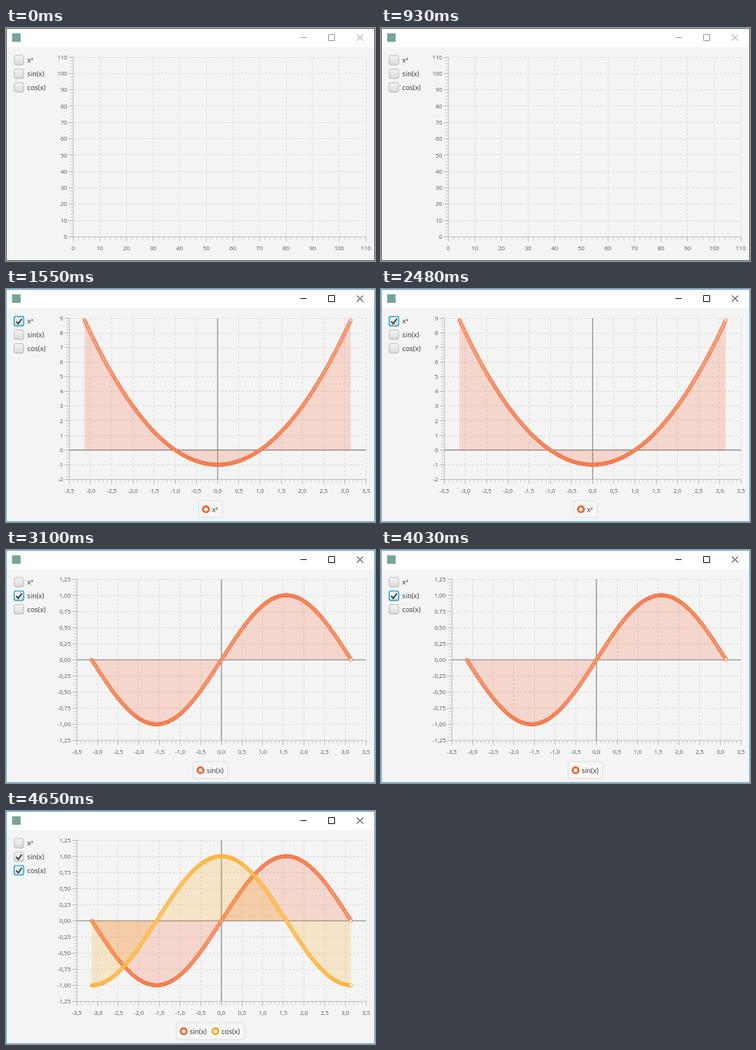
Animation, 480 px wide and 304 px high, one loop 6.2 s. Source, as an HTML page:

```html
<!DOCTYPE html>
<html lang="en">
<head>
<meta charset="utf-8">
<title>Function plotter</title>
<style>
  html, body { margin: 0; width: 100%; height: 100%; overflow: hidden; background: #f4f4f4; }
  svg { position: absolute; left: 0; top: 0; display: block; }
  text { font: 9px "Open Sans", "Noto Sans", sans-serif; fill: #333; }
  .tick { font-size: 7.5px; fill: #555; }
</style>
</head>
<body>
<svg id="stage" width="480" height="304" viewBox="0 0 480 304">
  <defs>
    <linearGradient id="box" x2="0" y2="1">
      <stop offset="0" stop-color="#f6f6f6"/>
      <stop offset="1" stop-color="#d9d9d9"/>
    </linearGradient>
  </defs>
</svg>
<script>
const LOOP = 6200;
const ORANGE = '#f3622d', YELLOW = '#fba71b';
const stage = document.getElementById('stage');

const FUNCS = {
  sq: { label: 'x²', color: ORANGE, f: x => x * x - 1 },
  sin: { label: 'sin(x)', color: ORANGE, f: Math.sin },
  cos: { label: 'cos(x)', color: YELLOW, f: Math.cos }
};
const NAMES = Object.keys(FUNCS);

// Axis: [min, max, step, decimals]; area: [left, top, right, bottom]
const X = [-3.5, 3.5, 0.5, 1], UNIT = [-1.25, 1.25, 0.25, 2], EMPTY = [0, 110, 10, 0];
const WIDE = [92.2, 38, 468.2, 248.4];
const SCENES = [
  { area: [87.5, 38, 468, 272.3], x: EMPTY, y: EMPTY, on: [] },
  { area: [82.3, 38, 468.3, 248.4], x: X, y: [-2, 9, 1, 0], on: ['sq'], focus: 'sq', legend: [250.5, 31] },
  { area: WIDE, x: X, y: UNIT, on: ['sin'], focus: 'sin', legend: [243.5, 45] },
  { area: WIDE, x: X, y: UNIT, on: ['sin', 'cos'], focus: 'cos', legend: [221.5, 89] }
];

function add(parent, tag, attrs, content) {
  const el = document.createElementNS('http://www.w3.org/2000/svg', tag);
  for (const k in attrs) el.setAttribute(k, attrs[k]);
  if (content !== undefined) el.textContent = content;
  parent.appendChild(el);
  return el;
}
const rect = (g, x, y, width, height, fill, more) => add(g, 'rect', { x, y, width, height, fill, ...more });
const path = (g, d, stroke, width = 1, more) =>
  add(g, 'path', { d, stroke, 'stroke-width': width, fill: 'none', ...more });

function drawWindow(g, active) {
  rect(g, 0, 0, 480, 304, '#f4f4f4');
  rect(g, 0, 0, 480, 25, '#fff');
  rect(g, 8, 7, 11, 11, '#78a39d');
  path(g, 'M383 12.5h8M419.5 8.5h8v8h-8zM456.5 8.5l8 8M464.5 8.5l-8 8', active ? '#111' : '#999');
  rect(g, 0.5, 0.5, 479, 303, 'none', { stroke: active ? '#58ace0' : '#5a5a5a' });
}

function drawChecks(g, scene) {
  NAMES.forEach((name, i) => {
    const y = 42 + i * 17.7, focused = scene.focus === name;
    if (focused) rect(g, 10, y - 6.7, 13.6, 13.4, '#039ed3', { rx: 2.4 });
    const inset = focused ? 11.2 : 10.7, size = focused ? 11.2 : 12.2;
    rect(g, inset, y - size / 2, size, size, 'url(#box)',
      { rx: 1.8, stroke: focused ? 'none' : '#b5b5b5', 'stroke-width': 0.9 });
    if (scene.on.includes(name)) path(g, `M13.3 ${y + 0.2}l2.6 3.1l4.8-6.6`, '#3c3c3c', 1.7);
    add(g, 'text', { x: 27.6, y: y + 3.3 }, FUNCS[name].label);
  });
}

function drawAxes(g, { area: [l, t, r, b], x, y }, px, py) {
  const vals = ([min, max, step]) =>
    Array.from({ length: Math.round((max - min) / step) + 1 }, (_, i) => min + i * step);
  const format = (v, digits) => v.toFixed(digits).replace('.', ',');
  const snap = v => Math.floor(v) + 0.5;
  let grid = '', major = '', minor = '';

  const labels = add(g, 'g', {});
  for (const v of vals(x)) {
    const p = snap(px(v));
    grid += `M${p} ${t}V${b}`;
    major += `M${p} ${b}v6`;
    add(labels, 'text', { class: 'tick', x: px(v), y: b + 18, 'text-anchor': 'middle' }, format(v, x[3]));
  }
  for (const v of vals(y)) {
    const p = snap(py(v));
    grid += `M${l} ${p}H${r}`;
    major += `M${l} ${p}h-6`;
    add(labels, 'text', { class: 'tick', x: l - 8, y: py(v) + 2.7, 'text-anchor': 'end' }, format(v, y[3]));
  }
  for (const v of vals([x[0], x[1], x[2] / 5])) minor += `M${px(v)} ${b}v4`;
  for (const v of vals([y[0], y[1], y[2] / 5])) minor += `M${l} ${py(v)}h-4`;

  path(g, grid, '#dcdcdc', 0.9, { 'stroke-dasharray': '3.2 2' });
  path(g, minor, '#c6c6c6', 0.8);
  path(g, major, '#b8b8b8', 0.9);
  path(g, `M${snap(l)} ${t}V${snap(b)}H${r}`, '#c4c4c4');
  if (x[0] < 0) path(g, `M${l} ${py(0)}H${r}M${px(0)} ${t}V${b}`, '#858585', 1.1);
}

function drawSeries(g, { f, color }, px, py) {
  const points = [];
  for (let x = -Math.PI; x <= Math.PI; x += 0.01) points.push([px(x), py(f(x))]);
  const line = 'M' + points.map(p => p.map(v => v.toFixed(2)).join(' ')).join('L');
  const first = points[0][0], last = points[points.length - 1][0];
  path(g, `${line}L${last} ${py(0)}L${first} ${py(0)}Z`, 'none', 0, { fill: color, 'fill-opacity': 0.2 });
  path(g, line, color, 0.8);
  const dots = add(g, 'g', { fill: '#fff', stroke: color, 'stroke-width': 0.8 });
  for (const [cx, cy] of points) add(dots, 'circle', { cx, cy, r: 2 });
}

function drawLegend(g, { on, legend: [x, width] }) {
  rect(g, x, 276, width, 22, '#f6f6f6', { rx: 3, stroke: '#dedede' });
  on.forEach((name, i) => {
    const { label, color } = FUNCS[name], cx = x + 9.6 + i * 41.3;
    add(g, 'circle', { cx, cy: 287.4, r: 3.8, fill: '#fff', stroke: color, 'stroke-width': 2.6 });
    add(g, 'text', { x: cx + 7.8, y: 290.7 }, label);
  });
}

SCENES.forEach((scene, i) => {
  const g = add(stage, 'g', { opacity: 0 });
  const [l, t, r, b] = scene.area;
  const px = v => l + (v - scene.x[0]) / (scene.x[1] - scene.x[0]) * (r - l);
  const py = v => b - (v - scene.y[0]) / (scene.y[1] - scene.y[0]) * (b - t);

  drawWindow(g, i > 0);
  drawChecks(g, scene);
  drawAxes(g, scene, px, py);
  scene.on.forEach(name => drawSeries(g, FUNCS[name], px, py));
  if (scene.legend) drawLegend(g, scene);

  const share = 1 / SCENES.length;
  g.animate([
    { opacity: 1, offset: 0 }, { opacity: 1, offset: share },
    { opacity: 0, offset: share }, { opacity: 0, offset: 1 }
  ], { duration: LOOP, iterations: Infinity, iterationStart: i ? 1 - i * share : 0 });
});
</script>
</body>
</html>
```
